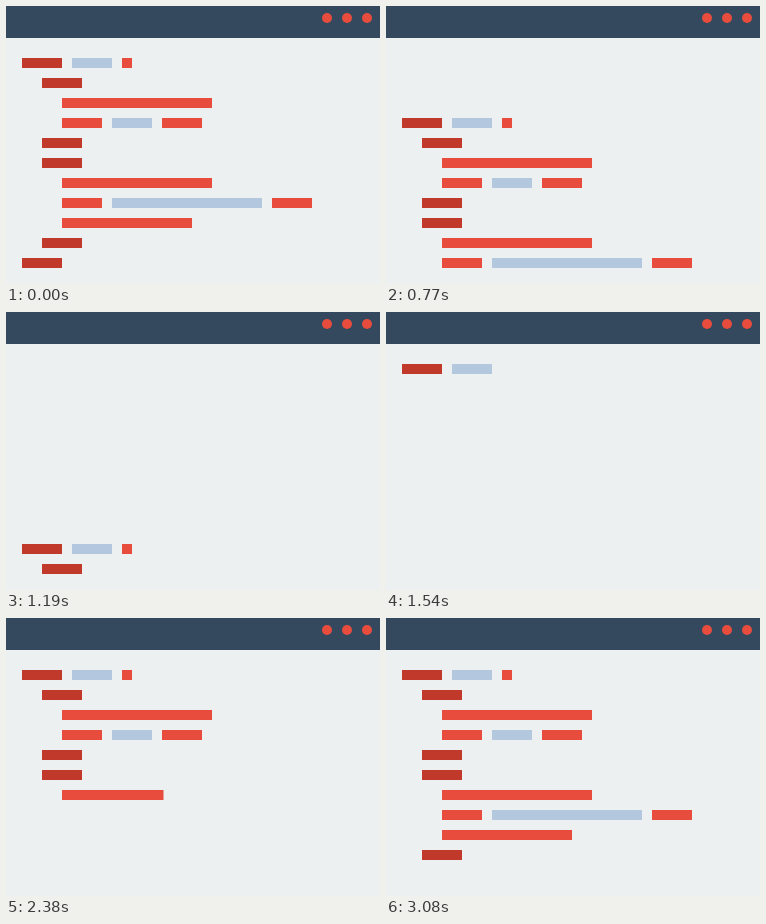
These frames come from a looping animation (374x278 px, 3150 ms). An HTML page:

```html
<!DOCTYPE html>
<html lang="en">
<head>
<meta charset="utf-8">
<title>Code window</title>
<style>
  html, body { margin: 0; width: 100%; height: 100%; overflow: hidden; background: #ecf0f1; }
  svg { display: block; width: 374px; height: 278px; }
</style>
</head>
<body>
<svg viewBox="0 0 374 278">
  <rect width="374" height="278" fill="#ecf0f1"/>
  <rect width="374" height="32" fill="#34495e"/>
  <g fill="#e74c3c">
    <circle cx="321" cy="12" r="5"/>
    <circle cx="341" cy="12" r="5"/>
    <circle cx="361" cy="12" r="5"/>
  </g>
  <g id="code"></g>
</svg>
<script>
const STEP = 70, STEPS = 45;
const SCROLL_START = 8, TYPE_START = 20;
const TOP = 52, LINE = 20, GAP = 10;
const COLORS = { d: '#c0392b', r: '#e74c3c', b: '#b3c8de' };

// Each line: indent, then colour key and width of every token.
const lines = [
  [16, 'd40 b40 r10'],
  [36, 'd40'],
  [56, 'r150'],
  [56, 'r40 b40 r40'],
  [36, 'd40'],
  [36, 'd40'],
  [56, 'r150'],
  [56, 'r40 b150 r40'],
  [56, 'r130'],
  [36, 'd40'],
  [16, 'd40']
];

const code = document.getElementById('code');
const tokens = [];
let clock = 0;

lines.forEach(([indent, text], row) => {
  let x = indent;
  for (const word of text.split(' ')) {
    const width = Number(word.slice(1));
    const steps = width > 40 ? 3 : 1;
    const el = document.createElementNS('http://www.w3.org/2000/svg', 'rect');
    el.setAttribute('x', x);
    el.setAttribute('height', 10);
    el.setAttribute('fill', COLORS[word[0]]);
    code.appendChild(el);
    tokens.push({ el, row, width, steps, start: clock });
    x += width + GAP;
    clock += steps;
  }
});

function typedPart(token, typed) {
  const part = (typed - token.start) / token.steps;
  return Math.max(0, Math.min(1, part * 1.015));
}

function render(time) {
  const step = Math.floor((time % (STEP * STEPS)) / STEP);
  const typing = step >= TYPE_START;
  const shift = typing ? 0 : Math.max(0, step - SCROLL_START);
  const typed = typing ? step - TYPE_START : clock;
  for (const token of tokens) {
    const row = token.row + shift;
    const part = row < lines.length ? typedPart(token, typed) : 0;
    token.el.setAttribute('y', TOP + row * LINE);
    token.el.setAttribute('width', token.width * part);
  }
}

const origin = performance.now();
function tick() {
  render(performance.now() - origin);
  requestAnimationFrame(tick);
}
tick();
</script>
</body>
</html>
```
